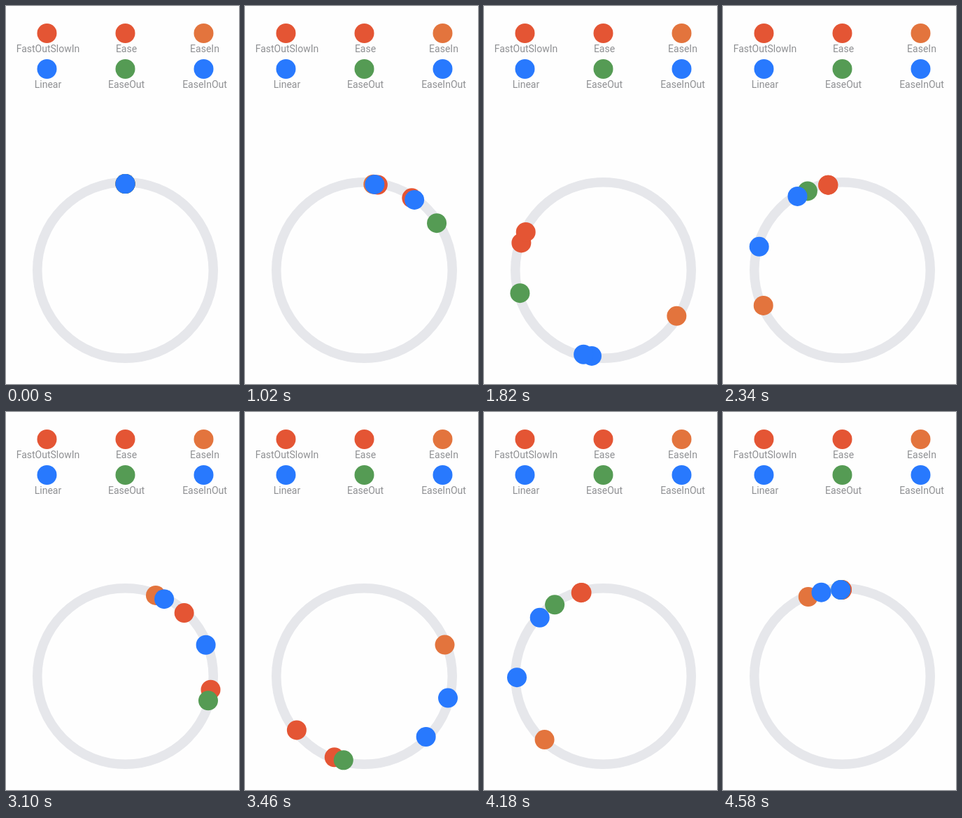
Recreate the animation shown at these times as an HTML page. Size 333 by 540 pixels, loop 4620 ms.

```html
<!DOCTYPE html>
<html lang="en">
<head>
<meta charset="utf-8">
<title>Easing curves</title>
<style>
  html, body { margin: 0; height: 100%; overflow: hidden; background: #fefefe; }
  svg { display: block; width: 333px; height: 540px; }
  text { font: 14px Roboto, sans-serif; fill: #8f9093; text-anchor: middle; }
</style>
</head>
<body>
<svg viewBox="0 0 333 540">
  <circle cx="170.5" cy="377.5" r="125.75" fill="none" stroke="#e6e7eb" stroke-width="13.5"/>
</svg>
<script>
const LOOP = 4620, STEP = 40, OFFSET = 20;
const CX = 170.5, CY = 377.5, ORBIT = 123.5, DOT = 14;
const RED = '#e45534', ORANGE = '#e3743d', BLUE = '#2879fe', GREEN = '#559b54';

// name, colour, cubic-bezier control points
const curves = [
  ['FastOutSlowIn', RED, 0.4, 0, 0.2, 1],
  ['Ease', RED, 0.25, 0.1, 0.25, 1],
  ['EaseIn', ORANGE, 0.42, 0, 1, 1],
  ['Linear', BLUE, 0, 0, 1, 1],
  ['EaseOut', GREEN, 0, 0, 0.58, 1],
  ['EaseInOut', BLUE, 0.42, 0, 0.58, 1]
];

// time in ms -> laps of the linear dot, with a short stall near the start
const laps = [
  [0, 0], [830, 0], [1020, 0.0985], [1100, 0.0985], [1140, 0.167],
  [1820, 0.5214], [2340, 0.794], [3100, 1.191], [3820, 1.556],
  [4580, 1.961], [4620, 1.982]
];

const svg = document.querySelector('svg');

function add(tag, attrs, text = '') {
  const el = document.createElementNS('http://www.w3.org/2000/svg', tag);
  for (const key in attrs) el.setAttribute(key, attrs[key]);
  el.textContent = text;
  return svg.appendChild(el);
}

function bezier(x1, y1, x2, y2) {
  const at = (a, b, s) => 3 * a * s * (1 - s) ** 2 + 3 * b * s * s * (1 - s) + s ** 3;
  return x => {
    let lo = 0, hi = 1;
    for (let i = 0; i < 30; i++) {
      const mid = (lo + hi) / 2;
      if (at(x1, x2, mid) < x) lo = mid; else hi = mid;
    }
    return at(y1, y2, lo);
  };
}

function lapAt(t) {
  const i = laps.findIndex(([end]) => t < end);
  const [t0, a] = laps[i - 1], [t1, b] = laps[i];
  return a + (b - a) * (t - t0) / (t1 - t0);
}

curves.forEach(([name, fill], i) => {
  const x = 58.5 + 112 * (i % 3), y = 39 + 51 * Math.floor(i / 3);
  add('circle', { cx: x, cy: y, r: DOT, fill });
  add('text', { x: x + 1.5, y: y + 27 }, name);
});

const dots = curves.map(([, fill, ...points]) => ({
  el: add('circle', { r: DOT, fill }),
  ease: bezier(...points)
}));

function draw() {
  const now = performance.now() % LOOP;
  const t = Math.max(0, Math.floor((now - OFFSET) / STEP) * STEP + OFFSET);
  const progress = lapAt(t) % 1;
  for (const { el, ease } of dots) {
    const angle = ease(progress) * 2 * Math.PI;
    el.setAttribute('cx', CX + ORBIT * Math.sin(angle));
    el.setAttribute('cy', CY - ORBIT * Math.cos(angle));
  }
  requestAnimationFrame(draw);
}
draw();
</script>
</body>
</html>
```
